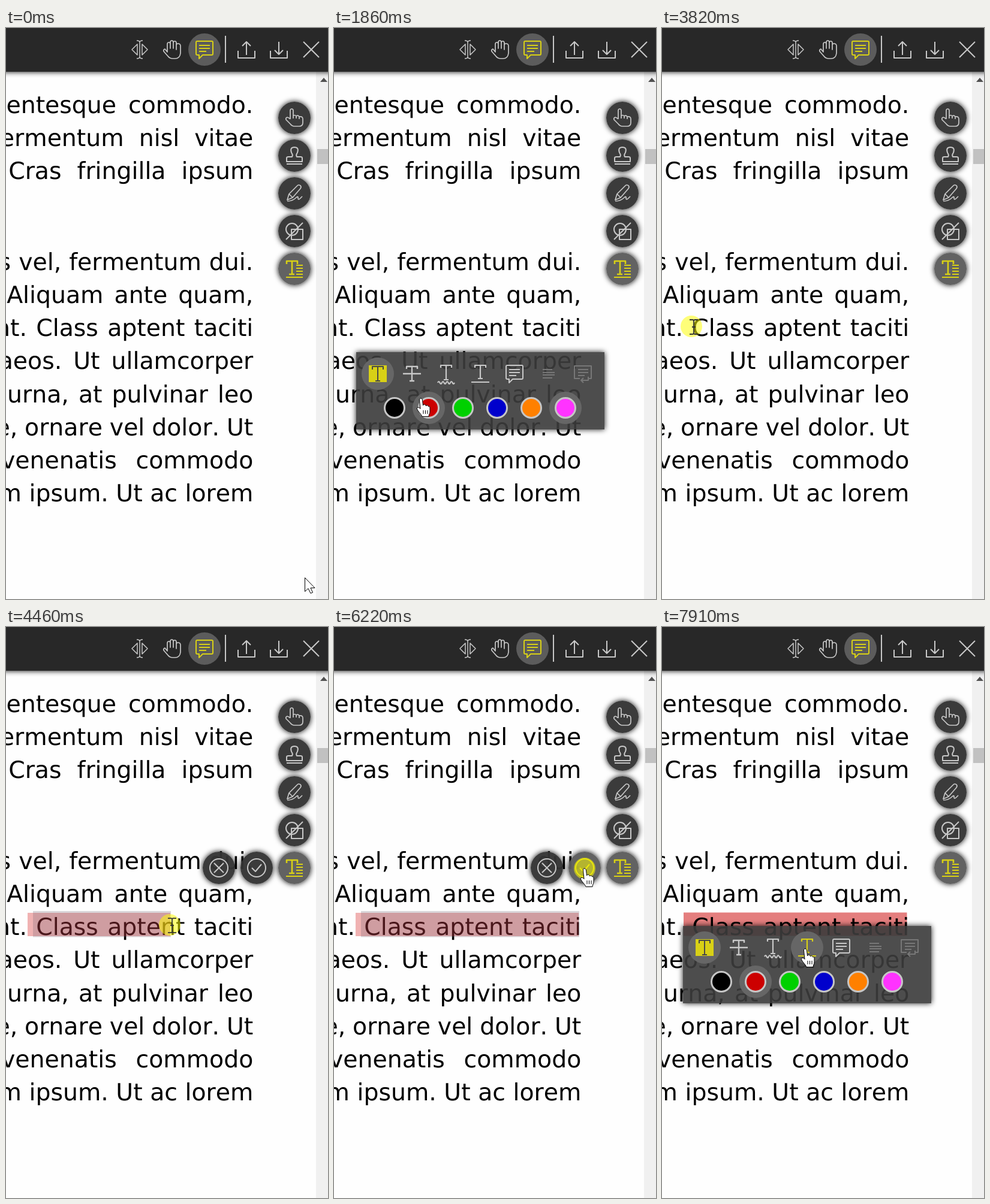
These frames come from a looping animation (537 px wide and 953 px high, 7990 ms). An HTML page:

```html
<!DOCTYPE html>
<html lang="en">
<head>
<meta charset="utf-8">
<title>Text annotation demo</title>
<style>
  html, body { margin: 0; width: 100%; height: 100%; overflow: hidden; background: #fefefe; }
  svg { display: block; width: 100vw; height: 100vh; }
  .page { font: 39.4px "DejaVu Sans", sans-serif; font-kerning: none; text-anchor: end; text-rendering: geometricPrecision; }
  .icon { fill: none; stroke: currentColor; stroke-width: 2; stroke-linejoin: round; color: #c8c8c8; }
  .icon.on { color: #d8d016; }
  .icon.off { color: #777; }
  .solid { fill: currentColor; stroke: none; }
  .disc { fill: #333; fill-opacity: .96; filter: url(#halo); }
  .disc.on { fill: #5c5c5c; }
  .ring { fill: #666; }
  .sheet { fill: #3c3c3c; fill-opacity: .9; filter: url(#halo); }
  .bar { fill: #282828; filter: url(#halo); }
</style>
</head>
<body>
<svg id="stage" viewBox="0 0 537 953" preserveAspectRatio="none"></svg>
<script>
const LOOP = 7990;

// baseline, extra word spacing, text
const lines = [
  [142, 7.5, 'Pellentesque commodo.'],
  [197, 12.6, 'fermentum nisl vitae'],
  [252, 13.5, 'Cras fringilla ipsum'],
  [404, .5, 'lobortis vel, fermentum dui.'],
  [459, 5.5, 'Aliquam ante quam,'],
  [514, 2.8, 'tincidunt. Class aptent taciti'],
  [569, 6.5, 'himenaeos. Ut ullamcorper'],
  [625, 3.5, 'urna, at pulvinar leo'],
  [680, -.6, 'neque, ornare vel dolor. Ut'],
  [735, 19.4, 'venenatis commodo'],
  [790, 0, 'diam ipsum. Ut ac lorem']
];

const path = (d, extra = '') => `<path d="${d}" ${extra}/>`;
const icon = (x, y, body, cls = '') =>
  `<g class="icon ${cls}" transform="translate(${x} ${y})">${body}</g>`;

const letterT = 'M-9 -7V-12H9V-7M0 -12V12M-4 12H4';
const art = {
  select: path('M0 -13V13M-5 -15Q0 -15 0 -12Q0 -15 5 -15M-5 15Q0 15 0 12Q0 15 5 15M-4 -9V9L-13 0ZM4 -9V9L13 0Z',
    'stroke-width="1.5"'),
  palm: path('M-8 4V-9Q-8 -12 -5.5 -12Q-3 -12 -3 -9V-2V-12Q-3 -15 -.5 -15Q2 -15 2 -12V-2V-11Q2 -14 4.5 -14'
    + 'Q7 -14 7 -11V0V-7Q7 -10 9.5 -10Q14 -10 14 -6V6Q13 15 5 15H1Q-4 15 -7 11L-14 3Q-15 0 -12 -1Z',
    'stroke-width="1.7"'),
  bubble: path('M-12 -14H12Q14 -14 14 -12V7Q14 9 12 9H-3L-9 15V9H-12Q-14 9 -14 7V-12Q-14 -14 -12 -14Z'
    + 'M-9 -7H9M-9 -2H9M-9 3H3'),
  upload: path('M-14 2V14H14V2M0 9V-13M-7 -6L0 -13L7 -6'),
  download: path('M-14 2V14H14V2M0 -13V8M-7 1L0 8L7 1'),
  close: path('M-13 -13L13 13M13 -13L-13 13'),
  pointer: path('M-7 2V-12Q-7 -15 -4.5 -15Q-2 -15 -2 -12V-3Q0 -6 3 -3Q6 -5 8 -2Q14 -3 14 2V8Q14 14 8 14H0'
    + 'Q-4 14 -7 10L-14 3Q-15 0 -12 -1Q-10 -1 -7 2M-2 -3V1M3 -3V1M8 -2V2', 'stroke-width="1.7"'),
  stamp: path('M-13 14H13M-13 10V4Q-13 2 -10 2H-4Q-2 -1 -5 -5Q-8 -14 0 -14Q8 -14 5 -5Q2 -1 4 2H10Q13 2 13 4V10Z'),
  pen: path('M-12 11L-9 1L5 -13Q7 -15 10 -13Q12 -11 10 -8L-3 7ZM-9 1L-3 7M-12 13Q-3 13 3 7Q7 4 6 8Q6 13 13 5',
    'stroke-width="1.7"'),
  shapes: '<circle cx="-4" cy="-3" r="10"/>' + path('M-5 -3H14V14H-5ZM-14 14L14 -14'),
  textTool: path('M-13 -8V-13H5V-8M-4 -13V9M-9 9H0', 'stroke-width="2.6"')
    + path('M3 -6H14M3 -1H14M3 4H14M3 9H14M-14 14H14'),
  marker: '<rect class="solid" x="-15" y="-14" width="30" height="28"/>' + path(letterT, 'stroke="#484848"'),
  strike: path('M-9 -8V-12H9V-8M0 -12V12M-4 12H4M-15 0H15', 'stroke-width="2.4"'),
  squiggle: path('M-9 -10V-14H9V-10M0 -14V10M-4 10H4M-14 15' + 'q1.75 -4 3.5 0t3.5 0'.repeat(4), 'stroke-width="2.2"'),
  underline: path('M-9 -10V-14H9V-10M0 -14V8M-4 8H4M-15 14H15', 'stroke-width="2.2"'),
  rows: path('M-10 -7H6M-10 -2H10M-10 2H10M-10 7H6'),
  reply: path('M-5 8H-14V-13H14V8H8M-8 -7H9M-8 -2H9M-8 3H3M9 5V11H-3M1 7L-3 11L1 15'),
  cross: '<circle r="15"/>' + path('M-8 -8L8 8M8 -8L-8 8'),
  check: '<circle r="15"/>' + path('M-8 0L-2 6L8 -6')
};

const header = [['select', 223], ['palm', 277], ['bubble', 331], ['upload', 401], ['download', 455], ['close', 509]];
const side = ['pointer', 'stamp', 'pen', 'shapes', 'textTool'];
const tools = ['marker', 'strike', 'squiggle', 'underline', 'bubble', 'rows', 'reply'];
const colors = ['#000', '#c00', '#00d000', '#00c', '#ff8000', '#f3f'];
const disc = (x, y, cls = '') => `<circle class="disc ${cls}" cx="${x}" cy="${y}" r="27"/>`;

// panel buttons: centres relative to the panel corner
const buttons = [
  ...tools.map((name, i) => ({ x: 36 + 57 * i, y: 36, name, enabled: i < 5 })),
  ...colors.map((color, i) => ({ x: 64 + 57 * i, y: 93, color, enabled: true }))
];
const buttonMarkup = b => `<g class="button"><circle class="ring" cx="${b.x}" cy="${b.y}" r="27"/>` +
  (b.name ? icon(b.x, b.y, art[b.name], b.enabled ? '' : 'off')
    : `<circle cx="${b.x}" cy="${b.y}" r="16.5" fill="${b.color}" stroke="#c6c6c6" stroke-width="3"/>`) + '</g>';

const stage = document.getElementById('stage');
// the halo is cut out below its shape, so translucent fills stay clear
stage.innerHTML = `
  <filter id="halo" x="-50%" y="-50%" width="200%" height="200%" color-interpolation-filters="sRGB">
    <feGaussianBlur in="SourceAlpha" stdDeviation="5"/>
    <feComposite in2="SourceAlpha" operator="out" result="shadow"/>
    <feMerge><feMergeNode in="shadow"/><feMergeNode in="SourceGraphic"/></feMerge>
  </filter>
  <rect width="537" height="953" fill="#fefefe"/>
  <rect id="mark" x="36" y="476.5" width="372.5" height="39" fill="#c00" fill-opacity=".5"/>
  <g class="page">${lines.map(([y, gap, text]) =>
    `<text x="412.3" y="${y}" style="word-spacing:${gap}px">${text}</text>`).join('')}</g>
  <g id="selection">
    <rect id="tint" x="36" y="477" height="39" fill="#c00" fill-opacity=".3"/>
    <rect id="native" x="45" y="474" height="43.5" fill="#6c5e6e" fill-opacity=".25"/>
  </g>
  <rect x="517" y="73" width="20" height="880" fill="#f0f0f0"/>
  <rect x="519" y="202" width="18" height="25" fill="#c1c1c1"/>
  <path d="M524 90L530 83L536 90Z" fill="#505050"/>
  <rect class="bar" x="-20" y="-20" width="577" height="93"/>
  <circle cx="331" cy="36" r="27" fill="#5c5c5c"/>
  ${header.map(([name, x]) => icon(x, 36, art[name], x === 331 ? 'on' : '')).join('')}
  <path d="M366 13V58" stroke="#c8c8c8" stroke-width="2"/>
  ${side.map((name, i) => {
    const cls = i === 4 ? 'on' : '';
    return disc(481, 150 + 63 * i, cls) + icon(481, 150 + 63 * i, art[name], cls);
  }).join('')}
  <g id="confirm">${disc(355, 402)}${icon(355, 402, art.cross)}
    <g id="accept">${disc(418, 402)}${icon(418, 402, art.check)}</g></g>
  <g id="panel"><rect class="sheet" width="414" height="129"/>${buttons.map(buttonMarkup).join('')}</g>
  <circle id="press" r="18" fill="#ff0" fill-opacity=".52"/>
  <g id="cursor" stroke="#000" fill="#fff" stroke-linejoin="round">
    ${path('M.5 .5V23.5L6 18.5L10 26.5L13.5 25L10 17.5H17Z', 'id="arrow"')}
    ${path('M-2.5 3C-3 -1 2 -1 2.5 3L3.5 12C4.5 9 8 10 8.5 13C9.5 11 12 11.5 12.5 14C14 13 15 14 15 16V22'
      + 'C15 26 13 27 13 30.5H2C1 27 -4 23 -6 19C-8 15 -4 13.5 -1 17.5ZM4 20V26M7.5 20V26M11 20V26', 'id="hand"')}
    ${path('M-3 -11H2Q4 -11 4 -9Q4 -11 6 -11H11M4 -10V12M-3 13H2Q4 13 4 11Q4 13 6 13H11M1 1H7',
      'id="beam" fill="none" stroke="#333" stroke-width="1.8"')}
  </g>`;

const el = id => document.getElementById(id);
const show = (node, on) => { node.style.display = on ? '' : 'none'; };

// bursts of screen updates: first, last, count
const ticks = [0];
for (const [first, last, count] of [[90, 650, 7], [910, 1480, 7], [1660, 2430, 9], [2520, 3270, 9], [3440, 3440, 1],
  [3820, 4560, 9], [4650, 5210, 7], [5660, 5660, 1], [5850, 6580, 9], [6680, 7060, 5], [7510, 7910, 5]]) {
  for (let i = 0; i < count; i++)
    ticks.push(Math.floor((first + (last - first) * i / Math.max(1, count - 1)) / 10) * 10);
}

// pointer route: time, x, y
const route = [[0, 498, 917], [460, 451, 543], [820, 451, 543], [1190, 300, 591], [1480, 74, 568], [1660, 74, 568],
  [1850, 145, 618], [2040, 161, 637], [2430, 161, 637], [2800, 74, 562], [3080, 43, 475], [3270, 50, 498],
  [3440, 49, 498], [3820, 49, 498], [4560, 308, 497], [5210, 407, 496], [5760, 407, 496], [6030, 418, 403],
  [6300, 418, 403], [6580, 451, 512], [6680, 455, 508], [6870, 450, 500], [7420, 450, 500], [7910, 239, 537]];
const presses = [[460, 650], [1660, 1750], [2140, 2330], [3820, 5660], [6120, 6300], [6870, 7060]];

function pointerAt(t) {
  const i = route.findIndex(key => key[0] > t);
  if (i < 0) return route[route.length - 1].slice(1);
  const [t0, x0, y0] = route[i - 1], [t1, x1, y1] = route[i];
  const p = (t - t0) / (t1 - t0);
  return [x0 + (x1 - x0) * p, y0 + (y1 - y0) * p];
}

const within = (t, from, to) => t >= from && t < to;
const buttonNodes = [...document.querySelectorAll('.button')];

function render(time) {
  const t = ticks.filter(tick => tick <= time).pop();
  const [x, y] = pointerAt(t);
  const firstPanel = within(t, 650, 3820), panelOpen = firstPanel || t >= 7060;
  const [px, py] = firstPanel ? [37, 541] : [35, 499];
  const confirming = within(t, 3900, 6300);
  const tool = t < 1660 ? 'strike' : 'marker';
  const color = t < 2330 ? '#f3f' : '#c00';

  let overButton = false;
  buttons.forEach((b, i) => {
    const hover = panelOpen && b.enabled && Math.hypot(x - px - b.x, y - py - b.y) < 27;
    const active = hover || (b.name ? b.name === tool : b.color === color);
    overButton ||= hover;
    show(buttonNodes[i].firstChild, active);
    if (b.name) buttonNodes[i].lastChild.classList.toggle('on', active);
  });
  const overAccept = confirming && Math.hypot(x - 418, y - 402) < 27;
  for (const node of el('accept').children) node.classList.toggle('on', overAccept);

  show(el('panel'), panelOpen);
  el('panel').setAttribute('transform', `translate(${px} ${py})`);
  show(el('confirm'), confirming);
  show(el('mark'), t >= 6300);
  show(el('selection'), confirming);
  const edge = t < 5210 ? x + 1 : 408;
  el('tint').setAttribute('width', edge - 36);
  el('native').setAttribute('width', edge - 44);

  const overPanel = panelOpen && x >= px && x < px + 414 && y >= py && y < py + 129;
  const kind = overButton || overAccept ? 'hand' : overPanel || x > 413 ? 'arrow' : 'beam';
  for (const id of ['arrow', 'hand', 'beam']) show(el(id), id === kind);
  el('cursor').setAttribute('transform', `translate(${x} ${y})`);
  show(el('press'), presses.some(([from, to]) => within(t, from, to)));
  el('press').setAttribute('cx', x);
  el('press').setAttribute('cy', y);
}

const start = performance.now();
function loop() {
  render((performance.now() - start) % LOOP);
  requestAnimationFrame(loop);
}
loop();
</script>
</body>
</html>
```
